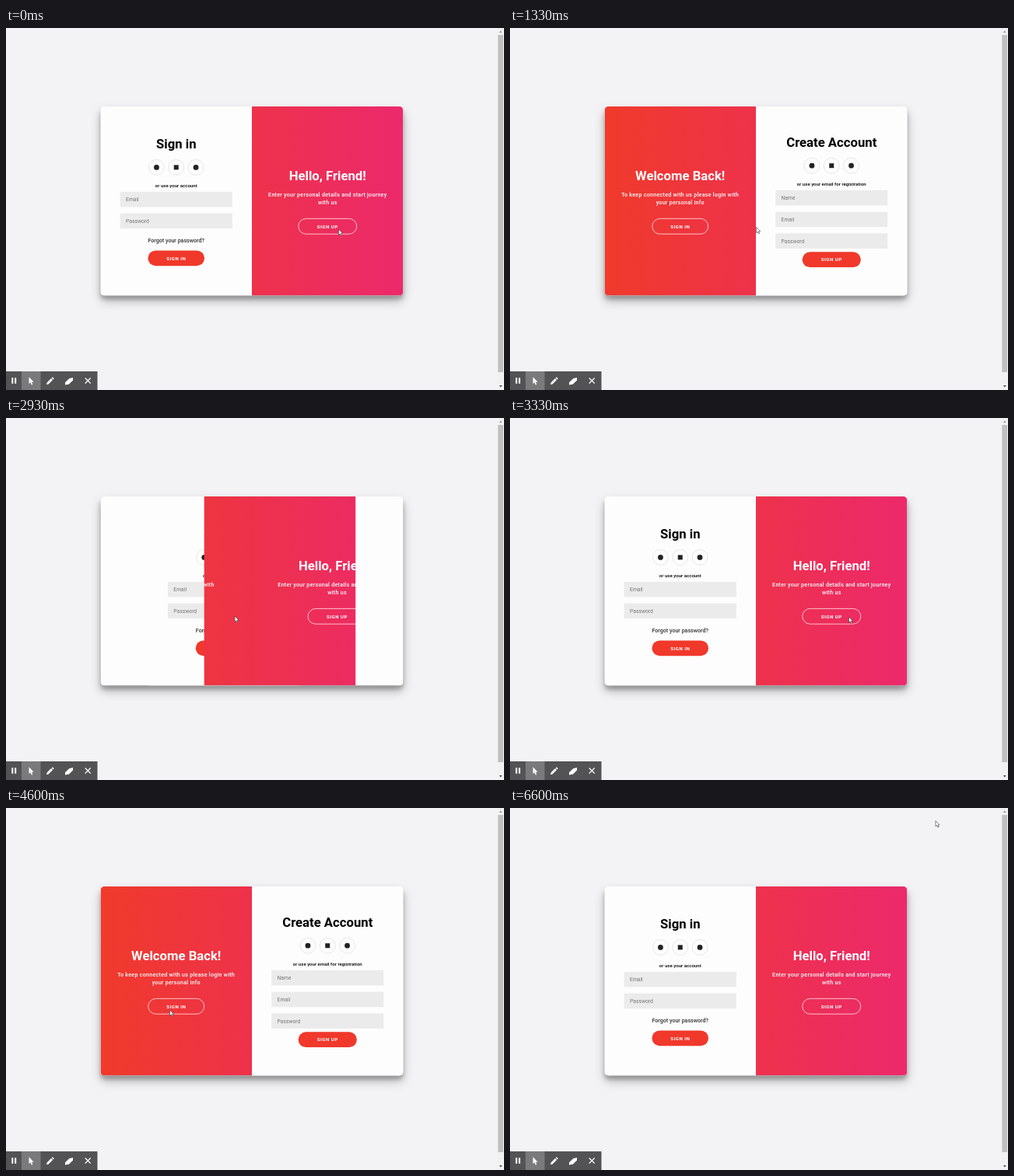
Recreate the animation shown at these times as an HTML page. Size 640 px wide and 466 px high, loop 7660 ms.

```html
<!DOCTYPE html>
<html lang="en">
<head>
<meta charset="utf-8">
<title>Sliding sign-in form</title>
<style>
  html, body { margin: 0; width: 100%; height: 100%; overflow: hidden; background: #f3f3f5; }
  svg { display: block; font-family: Roboto, sans-serif; }
  text { text-anchor: middle; }
  .title { font-size: 16.7px; font-weight: 700; }
  .lead { font-size: 7.1px; font-weight: 500; letter-spacing: .27px; }
  .note { font-size: 6.1px; font-weight: 500; }
  .link { font-size: 7.1px; font-weight: 500; fill: #333; }
  .hint { font-size: 6.75px; fill: #757575; text-anchor: start; }
  .label { font-size: 6.1px; font-weight: 700; letter-spacing: .51px; fill: #fff; }
  #overlay { fill: #fff; }
</style>
</head>
<body>
<svg id="stage" width="640" height="466" viewBox="0 0 640 466"></svg>
<script>
const LOOP = 7660, STEP = 200 / 3, SLIDE = 600;
const CARD = { x: 121.5, y: 101, w: 389, h: 243.5 };
const HALF = CARD.w / 2, LEFT = CARD.x + HALF / 2, RIGHT = LEFT + HALF;
const RED = '#f0382b';

const text = (kind, x, y, words) => `<text class="${kind}" x="${x}" y="${y}">${words}</text>`;
const rect = (x, y, w, h, attrs) => `<rect x="${x}" y="${y}" width="${w}" height="${h}" ${attrs}/>`;
const cardRect = attrs => rect(CARD.x, CARD.y, CARD.w, CARD.h, attrs);

const button = (x, y, w, words, attrs) =>
  rect(x - w / 2, y, w, 19.8, `rx="9.9" ${attrs}`) + text('label', x, y + 12.1, words);
const ghost = (x, w, words) => button(x, 245.4, w, words, 'fill="none" stroke="#fff" stroke-width=".7"');
const solid = (y, w, words) => button(LEFT, y, w, words, `fill="${RED}"`);
const field = (y, words) =>
  rect(LEFT - 72, y, 144, 19.6, 'fill="#ebebeb"') + text('hint', LEFT - 64.7, y + 12.1, words);

const socials = y => [-25.3, 0, 25.3].map(dx => {
  const x = LEFT + dx;
  const mark = dx ? `<circle cx="${x}" cy="${y}" r="3.4" fill="#222"/>`
                  : rect(x - 3, y - 3, 6, 6, 'fill="#222"');
  return `<circle cx="${x}" cy="${y}" r="10" fill="none" stroke="#ddd" stroke-width=".7"/>` + mark;
}).join('');

const form = (id, content) =>
  `<g id="${id}">${rect(CARD.x, CARD.y, HALF, CARD.h, 'fill="#fdfdfd"')}${content}</g>`;

const arrow = 'M0 0V7.3L1.7 5.8 2.8 8.4 4 7.9 2.9 5.4H5.1Z';

const toolbar = rect(0, 442, 117.5, 24, 'fill="#535355"') + rect(20, 442, 24.5, 24, 'fill="#7a7a7c"') + `
  <g fill="#fff">
    <path d="M7.3 450.3h2v7.4h-2zM11.2 450.3h2v7.4h-2z"/>
    <path transform="translate(29.5 449.3) scale(1.2)" d="${arrow}"/>
    <path d="M52 459l.6-2.6 5.4-5.3 2 2-5.4 5.3zM58.7 450.4l1.1-1.1 2 2-1.1 1.1z"/>
    <path d="M76 456.3l5.2-5 4.8-1.2v3.4l-5 5-5 1z"/>
    <path d="M101.7 450.5l7 7m0-7l-7 7" stroke="#fff" stroke-width="1.2"/>
  </g>`;

const scrollbar = rect(631.5, 0, 8.5, 466, 'fill="#f1f1f1"') + rect(632.3, 9, 6.7, 434, 'fill="#c0c0c0"') + `
  <path d="M633.8 6l2-2.4 2 2.4z" fill="#9a9a9a"/><path d="M633.8 460l2 2.4 2-2.4z" fill="#505050"/>`;

stage.innerHTML = `
  <defs>
    <linearGradient id="blend" gradientUnits="userSpaceOnUse" x1="${CARD.x}" x2="${CARD.x + CARD.w}">
      <stop stop-color="#f03a2b"/><stop offset="1" stop-color="#ec296c"/>
    </linearGradient>
    <clipPath id="cardClip">${cardRect('rx="5"')}</clipPath>
    <clipPath id="overlayClip">${rect(CARD.x + HALF, CARD.y, HALF, CARD.h, 'id="pane"')}</clipPath>
  </defs>
  ${cardRect('rx="5" opacity=".25" style="filter:blur(7px)" transform="translate(0 7)"')}
  ${cardRect('rx="5" opacity=".22" style="filter:blur(2.5px)" transform="translate(0 5)"')}
  <g clip-path="url(#cardClip)">
    ${cardRect('fill="#fdfdfd"')}
    ${form('signIn',
      text('title', LEFT, 155, 'Sign in') + socials(179.4) + text('note', LEFT, 205.1, 'or use your account') +
      field(210.8, 'Email') + field(238.6, 'Password') +
      text('link', LEFT, 276.4, 'Forgot your password?') + solid(286.4, 72.6, 'SIGN IN'))}
    ${form('signUp',
      text('title', LEFT, 153, 'Create Account') + socials(177.2) +
      text('note', LEFT, 203.1, 'or use your email for registration') +
      field(208.8, 'Name') + field(236.6, 'Email') + field(264.4, 'Password') + solid(288.3, 75.2, 'SIGN UP'))}
    <g id="overlay" clip-path="url(#overlayClip)">
      ${cardRect('fill="url(#blend)"')}
      <g id="welcome">
        ${text('title', LEFT, 195.6, 'Welcome Back!')}
        ${text('lead', LEFT, 216.8, 'To keep connected with us please login with')}
        ${text('lead', LEFT, 227, 'your personal info')}
        ${ghost(LEFT, 72, 'SIGN IN')}
      </g>
      <g id="hello">
        ${text('title', RIGHT, 195.6, 'Hello, Friend!')}
        ${text('lead', RIGHT, 216.8, 'Enter your personal details and start journey')}
        ${text('lead', RIGHT, 227, 'with us')}
        ${ghost(RIGHT, 75, 'SIGN UP')}
      </g>
    </g>
  </g>
  ${toolbar}${scrollbar}
  <g id="cursor">
    <circle id="ring" r="10.8" fill="#e0203a" fill-opacity=".15" stroke="#d81f36" stroke-width="1.2"/>
    <path d="${arrow}" fill="#fff" stroke="#333" stroke-width=".6"/>
  </g>`;

// Clicks alternate: to sign up, back to sign in, and so on.
const clicks = [532, 2567, 3905, 4950];

// Pointer path: time, x, y
const path = [
  [0, 427.5, 259], [733, 425, 257.5], [1000, 425, 257], [1600, 230, 256], [2000, 226, 254],
  [2600, 225.5, 253.5], [2800, 226, 254], [3200, 430, 257], [3333, 435.5, 256], [3600, 432, 256],
  [3950, 431, 256], [4500, 212, 260], [4600, 210.5, 260], [4980, 210, 258], [5333, 399, 138],
  [5860, 556, 6], [6330, 556, 6], [6600, 547, 16.5], [LOOP, 547, 16.5]
];

// cubic-bezier(.42, 0, .58, 1)
function easeInOut(x) {
  if (x <= 0 || x >= 1) return x <= 0 ? 0 : 1;
  let lo = 0, hi = 1, s;
  for (let i = 0; i < 24; i++) {
    s = (lo + hi) / 2;
    const r = 1 - s;
    if (1.26 * s * r * r + 1.74 * s * s * r + s ** 3 < x) lo = s; else hi = s;
  }
  return s * s * (3 - 2 * s);
}

function pointerAt(t) {
  const i = path.findIndex(([end]) => end > t);
  const [t0, x0, y0] = path[i - 1], [t1, x1, y1] = path[i];
  const k = (t - t0) / (t1 - t0);
  return [x0 + (x1 - x0) * k, y0 + (y1 - y0) * k];
}

const move = (el, x, y = 0) => el.setAttribute('transform', `translate(${x} ${y})`);
const $ = id => document.getElementById(id);
const [signIn, signUp, pane, welcome, hello, cursor, ring] =
  ['signIn', 'signUp', 'pane', 'welcome', 'hello', 'cursor', 'ring'].map($);

function draw(t) {
  const last = clicks.filter(c => c <= t).length - 1;
  const opening = last % 2 === 0;
  const time = last < 0 ? 1 : (t - clicks[last]) / SLIDE;
  const eased = easeInOut(time);
  const p = opening ? eased : 1 - eased;

  move(signIn, HALF * p);
  move(signUp, HALF * p);
  signUp.setAttribute('opacity', opening ? +(time >= .5) : eased < .625 ? 1 - eased : 0);
  pane.setAttribute('x', CARD.x + HALF * (1 - p));
  move(welcome, -.2 * HALF * (1 - p));
  move(hello, .2 * HALF * p);
  move(cursor, ...pointerAt(t));
  ring.setAttribute('opacity', +clicks.some(c => t > c - 110 && t < c + 110));
}

const start = performance.now();
function tick() {
  const t = (performance.now() - start) % LOOP;
  draw(Math.min(Math.floor((t + 7) / STEP) * STEP, LOOP - 1));
  requestAnimationFrame(tick);
}
tick();
</script>
</body>
</html>
```
